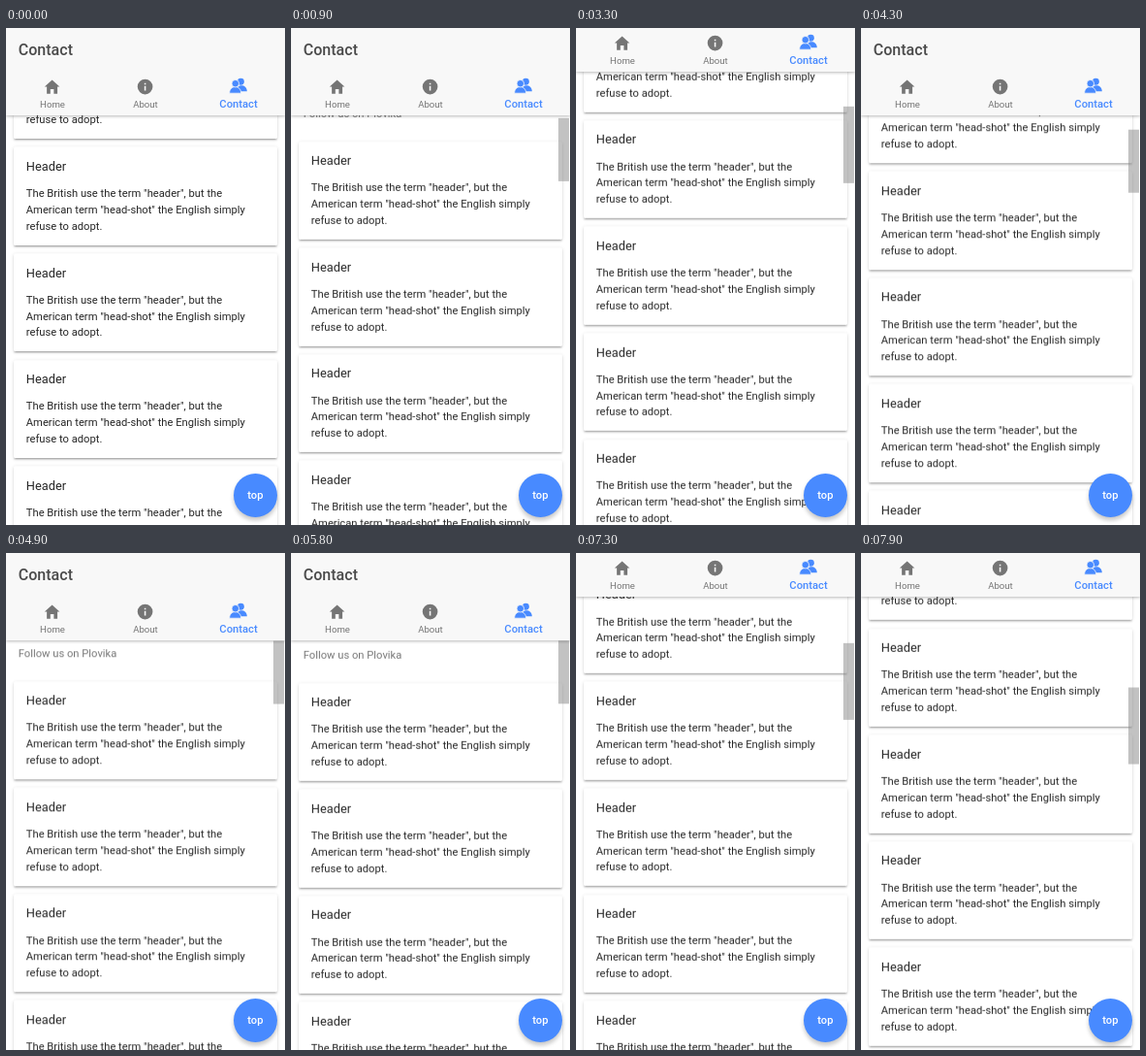
An HTML page for the animation above (8 s loop, 288 by 512 pixels).

```html
<!DOCTYPE html>
<html lang="en">
<head>
<meta charset="utf-8">
<title>Contact</title>
<style>
  html, body { margin: 0; width: 100%; height: 100%; overflow: hidden; background: #fff; }
  body { position: relative; font: 11.2px/16.8px Roboto, sans-serif; color: #262626; }
  #stage { position: absolute; width: 288px; height: 512px; overflow: hidden; background: #fff; }
  #stage div, #stage svg { position: absolute; }
  #list { left: 0; top: 0; width: 288px; will-change: transform; }
  .follow { left: 12.8px; top: 9.6px; color: #757575; white-space: nowrap; }
  .card {
    left: 8px; width: 272px; height: 101.6px; border-radius: 1.6px; background: #fff;
    box-shadow: 0 1.6px 1.6px rgba(0,0,0,.16), 0 2.4px .8px -1.6px rgba(0,0,0,.28), 0 .8px 4px rgba(0,0,0,.12);
  }
  .card div { left: 12.8px; white-space: pre; }
  .card .head { top: 12.7px; font-size: 12.8px; line-height: 15px; }
  .card .text { top: 40.9px; }
  #bar {
    left: 0; top: 0; width: 288px; height: 90px; background: #f8f8f8;
    box-shadow: 0 1px 3px rgba(0,0,0,.28);
  }
  .title { left: 12.8px; top: 13px; font-size: 16px; line-height: 20px; font-weight: 500; color: #4a4a4a; }
  .tab { top: 45px; width: 96px; height: 45px; text-align: center; color: #757575; fill: #757575; }
  .tab svg { left: 38.4px; top: 6.4px; width: 19.2px; height: 19.2px; }
  .tab div { width: 96px; top: 26.3px; font-size: 9.6px; }
  .tab.on { color: #488aff; fill: #488aff; }
  .tab.on svg { top: 5.2px; }
  .tab.on div { top: 26px; font-size: 11.2px; font-weight: 500; }
  #thumb { left: 276px; top: 0; width: 11px; background: rgba(128,128,128,.48); }
  #fab {
    left: 235px; top: 459.2px; width: 44.8px; height: 44.8px; border-radius: 50%;
    background: #488aff; color: #fff; font-weight: 500; line-height: 46px; text-align: center;
    box-shadow: 0 3.2px 4.8px rgba(0,0,0,.14), 0 3.2px 4px rgba(0,0,0,.1);
  }
</style>
</head>
<body>
<div id="stage">
  <div id="list"><div class="follow">Follow us on Plovika</div></div>
  <div id="thumb"></div>
  <div id="bar">
    <div class="title">Contact</div>
    <div class="tab" style="left:0">
      <svg viewBox="0 0 512 512"><path d="M208 448V320h96v128h98V256h62L256 64 48 256h62v192z"/></svg>
      <div>Home</div>
    </div>
    <div class="tab" style="left:96px">
      <svg viewBox="0 0 512 512"><circle cx="256" cy="256" r="208"/><path fill="#f8f8f8" d="M235 235h42v125h-42zM235 152h42v42h-42z"/></svg>
      <div>About</div>
    </div>
    <div class="tab on" style="left:192px">
      <svg viewBox="0 0 24 24">
        <circle cx="15.500" cy="6.500" r="4.300"/><path d="M10 19c0-10 13-10 13.500 0z"/>
        <g stroke="#f8f8f8"><path d="M.8 21.500c0-11 15-11 15 0z"/><circle cx="8.500" cy="9" r="4.700"/></g>
      </svg>
      <div>Contact</div>
    </div>
  </div>
  <div id="fab">top</div>
</div>
<script>
const LOOP = 8000, STEP = 100, CARDS = 25, PITCH = 109.6, FIRST = 45.5, PADDING = 16;
const CONTENT = FIRST + CARDS * PITCH + PADDING, VIEW = 512, BAR = 90;
const $ = id => document.getElementById(id);
const list = $('list'), bar = $('bar'), thumb = $('thumb');

for (let i = 0; i < CARDS; i++) {
  list.insertAdjacentHTML('beforeend', `<div class="card" style="top:${FIRST + i * PITCH}px">
    <div class="head">Header</div><div class="text">The British use the term "header", but the
American term "head-shot" the English simply
refuse to adopt.</div></div>`);
}

const linear = u => u;
const easeIn = u => u ** 1.6;
const easeOut = u => 1 - (1 - u) ** 3;
const easeInOut = u => u * u * (3 - 2 * u);

// [time, scroll offset, visible bar height, easing towards this key]
const keys = [
  [0, 341.8, 90],
  [400, 341.8, 90, linear],
  [1200, 1, 90, easeOut],
  [1800, 1, 90, linear],
  [1900, 0, 90, linear],
  [2700, 0, 90, linear],
  [3300, 215, 45, easeInOut],
  [3900, 215, 45, linear],
  [4300, 97.6, 90, easeOut],
  [4400, 96.6, 90, linear],
  [4500, 96.6, 90, linear],
  [5100, 0, 90, easeOut],
  [5700, 0, 90, linear],
  [5800, 2, 90, linear],
  [6700, 79.6, 56, easeIn],
  [7000, 150, 45, linear],
  [7900, 561, 45, linear]
];

function pose(t) {
  const i = keys.findIndex(k => k[0] > t);
  if (i < 0) return keys.at(-1).slice(1, 3);
  const a = keys[i - 1], b = keys[i];
  const u = b[3]((t - a[0]) / (b[0] - a[0]));
  return [1, 2].map(n => a[n] + (b[n] - a[n]) * u);
}

function draw(now) {
  const t = Math.floor(now % LOOP / STEP) * STEP;
  const [scroll, height] = pose(t);
  const view = VIEW - height, ratio = view / CONTENT;
  list.style.transform = `translateY(${height - scroll}px)`;
  bar.style.transform = `translateY(${height - BAR}px)`;
  thumb.style.transform = `translateY(${height + scroll * ratio}px)`;
  thumb.style.height = view * ratio + 1 + 'px';
  thumb.style.visibility = t < 500 ? 'hidden' : 'visible';
}

const start = performance.now();
function tick() {
  draw(performance.now() - start);
  requestAnimationFrame(tick);
}
tick();
</script>
</body>
</html>
```
